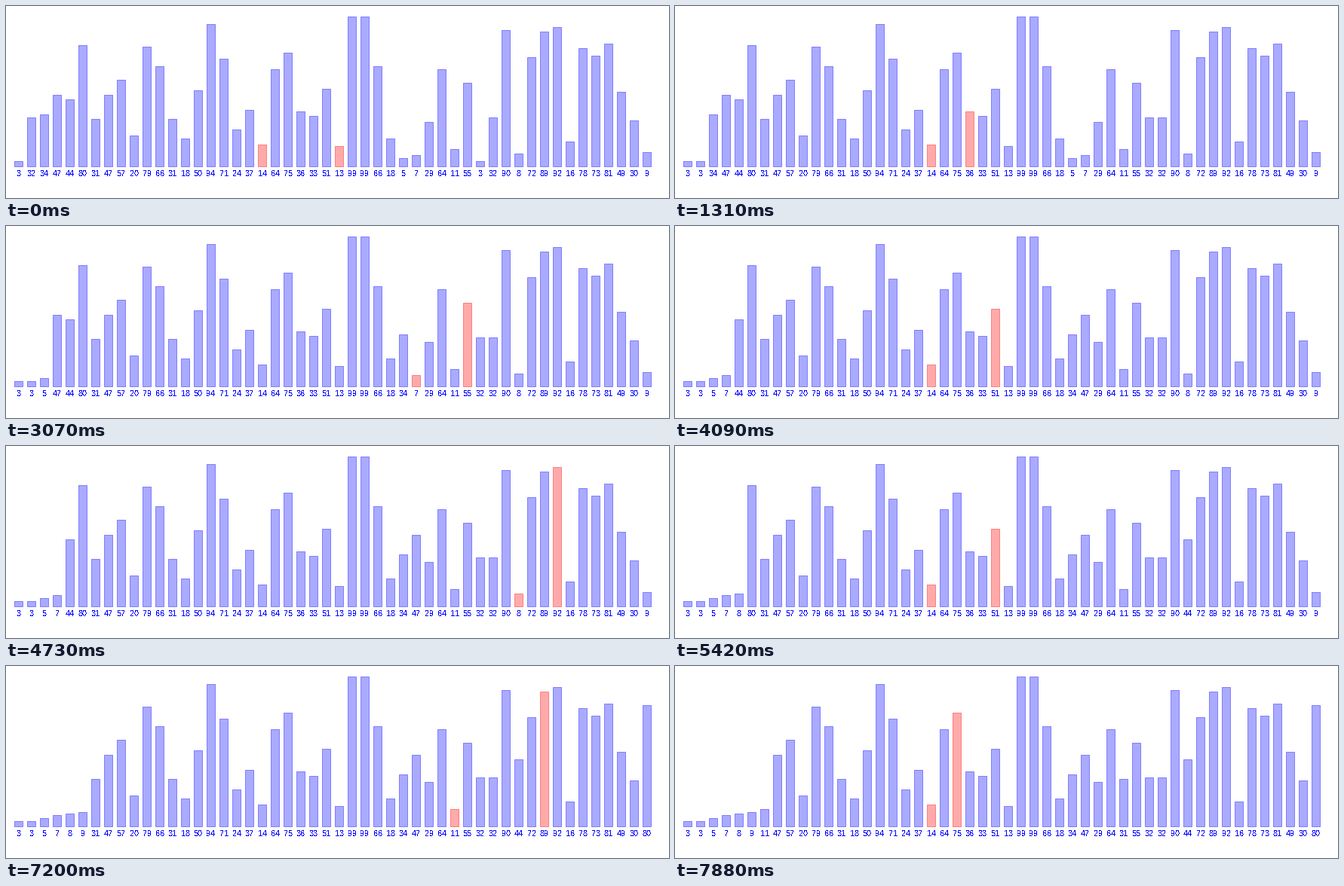
Write a matplotlib script that moves like this. It is 879x255 px and loops after 8 s.

```python
import numpy as np
import matplotlib.pyplot as plt
from matplotlib.animation import FuncAnimation
from matplotlib.patches import Rectangle

plt.rcParams.update({
    "text.hinting": "native",
    "text.hinting_factor": 1,
    "font.family": "Liberation Sans",
    "toolbar": "None",
})

W, H, DPI = 879, 255, 64
PX = 72 / DPI                      # one pixel in points
LOOP, TICK = 8000, 20
PITCH, LEFT, BASE = 17, 11, 213
STEP = 29.27                       # ms per comparison or swap
FIRST = 23                         # steps already taken when the loop starts

BLUE = ("#aaaaff", "#7f7fff")
RED = ("#ffaaaa", "#ff7f7f")
INK = "#0000ff"

VALUES = [3, 32, 34, 47, 44, 80, 31, 47, 57, 20, 79, 66, 31, 18, 50, 94, 71,
          24, 37, 14, 64, 75, 36, 33, 51, 13, 99, 99, 66, 18, 5, 7, 29, 64,
          11, 55, 3, 32, 90, 8, 72, 89, 92, 16, 78, 73, 81, 49, 30, 9]


def selection_sort(values, start):
    """Yield (values, highlighted pair) for every comparison and swap."""
    a = list(values)
    for i in range(start, len(a) - 1):
        low = i
        for j in range(i + 1, len(a)):
            yield list(a), (low, j)
            if a[j] < a[low]:
                low = j
        a[i], a[low] = a[low], a[i]
        yield list(a), (i, low)


STATES = list(selection_sort(VALUES, 1))

# The sort ticks evenly; the view refreshes 58 times at a slightly uneven pace.
REFRESH = np.interp(np.arange(58), [0, 9, 22, 29, 39, 52, 57],
                    [0, 1310, 3070, 4090, 5420, 7200, 7880])

fig = plt.figure(figsize=(W / DPI, H / DPI), dpi=DPI, facecolor="white")
ax = fig.add_axes([0, 0, 1, 1])
ax.set(xlim=(0, W), ylim=(H, 0))
ax.axis("off")

bars, labels = [], []
for k in range(len(VALUES)):
    bar = Rectangle((LEFT + PITCH * k, BASE), 11, 0, lw=PX, snap=True)
    bars.append(ax.add_patch(bar))
    labels.append(ax.text(0, 226, "", color=INK, fontsize=11 * PX,
                          ha="left", va="baseline", antialiased=False))


def draw(frame):
    now = (frame + 0.5) * TICK
    seen = REFRESH[REFRESH <= now][-1]
    values, pair = STATES[FIRST + round(seen / STEP)]
    for k, (v, bar, label) in enumerate(zip(values, bars, labels)):
        fill, edge = RED if k in pair else BLUE
        bar.set(height=-(2 * v + 1), facecolor=fill, edgecolor=edge)
        text = str(v)
        label.set_text(text)
        label.set_x(PITCH * (k + 1) - 3 * len(text))
    return bars + labels


anim = FuncAnimation(fig, draw, frames=LOOP // TICK, interval=TICK,
                     repeat=True, repeat_delay=0, blit=False)
plt.show()
```
